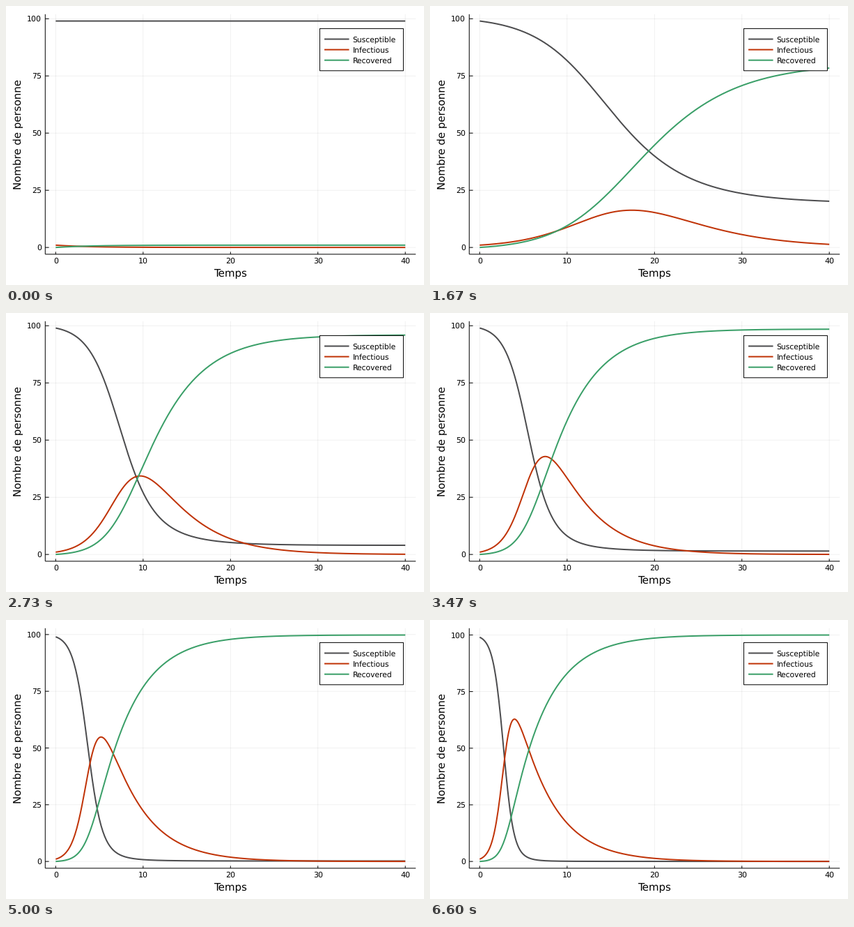
A matplotlib script that plays this animation: 600 px wide and 400 px high, repeating every 6.67 s.

```python
import numpy as np
import matplotlib.pyplot as plt
from matplotlib.animation import FuncAnimation
from matplotlib.patches import Rectangle

W, H, DPI = 600, 400, 100
LOOP, STEPS, TICKS = 6670, 100, 4   # each step lasts four timer ticks
LEFT, RIGHT, TOP, BOTTOM = 56.3, 588.2, 11.8, 355.9
T_MAX, DT = 40, 0.1
GAMMA = 0.25
BETAS = np.linspace(0, 2, STEPS)
SERIES = [("Susceptible", "#4c4c4e"), ("Infectious", "#c03307"), ("Recovered", "#3a9f68")]

plt.rcParams.update({"font.family": "DejaVu Sans", "text.hinting": "none"})


def px(n):
    return n * 72 / DPI


def sir(beta):
    """Euler steps of the SIR model, population in percent."""
    steps = int(round(T_MAX / DT))
    out = np.empty((steps + 1, 3))
    s, i, r = out[0] = 99.0, 1.0, 0.0
    for n in range(steps):
        infected = beta * s * i / 100 * DT
        healed = GAMMA * i * DT
        s, i, r = s - infected, i + infected - healed, r + healed
        out[n + 1] = s, i, r
    return out


def to_x(t):
    pad = 0.03 * T_MAX
    return LEFT + (t + pad) / (T_MAX + 2 * pad) * (RIGHT - LEFT)


def to_y(v, top):
    return BOTTOM - (v / top + 0.03) / 1.06 * (BOTTOM - TOP)


fig = plt.figure(figsize=(W / DPI, H / DPI), dpi=DPI, facecolor="white")
ax = fig.add_axes([0, 0, 1, 1])
ax.set(xlim=(0, W), ylim=(H, 0))
ax.axis("off")


def line(xs, ys, color="black", width=1.0, **kw):
    return ax.plot(xs, ys, color=color, lw=px(width), solid_capstyle="butt",
                   solid_joinstyle="round", snap=False, **kw)[0]


def label(x, y, text, size=11, **kw):
    return ax.text(x, y, text, fontsize=px(size), va="baseline", **kw)


def grid_line(xs, ys):
    return line(xs, ys, width=0.8, alpha=0.07, zorder=1)


# Axes
line([LEFT, LEFT], [TOP, BOTTOM], zorder=2)
line([LEFT, RIGHT], [BOTTOM, BOTTOM], zorder=2)
x_tick = 0.01 * (BOTTOM - TOP)
y_tick = 0.01 * (RIGHT - LEFT)

for t in range(0, T_MAX + 1, 10):
    x = to_x(t)
    grid_line([x, x], [TOP, BOTTOM])
    line([x, x], [BOTTOM, BOTTOM - x_tick], zorder=2)
    label(x, 369.2, str(t), ha="center")

y_marks = []
for v in range(0, 101, 25):
    y_marks.append((v, grid_line([LEFT, RIGHT], [0, 0]),
                    line([LEFT, LEFT + y_tick], [0, 0], zorder=2),
                    label(51, 0, str(v), ha="right")))

label((LEFT + RIGHT) / 2, 388.9, "Temps", 15, ha="center")
label(21.8, 184.3, "Nombre de personne", 15, ha="center",
      rotation=90, rotation_mode="anchor")

# Curves and legend
times = to_x(np.linspace(0, T_MAX, int(round(T_MAX / DT)) + 1))
curves = [line(times, times, color, 2, zorder=3) for _, color in SERIES]

ROW = 15.1
ax.add_patch(Rectangle((450.4, 32.4), 120, 4 * ROW, fc="white", ec="black",
                       lw=px(1), snap=False, zorder=4))
for n, (name, color) in enumerate(SERIES):
    y = 32.4 + ROW * (n + 1)
    line([457, 492.5], [y, y], color, 2, zorder=5)
    label(497.5, y + 4.4, name, 10.8, zorder=5)

runs = [sir(beta) for beta in BETAS]


def update(tick):
    # Switch one tick ahead so that rounding never delays a step.
    data = runs[min((tick + 1) // TICKS, STEPS - 1)]
    top = data.max()
    for curve, values in zip(curves, data.T):
        curve.set_ydata(to_y(values, top))
    for v, grid, mark, text in y_marks:
        y = to_y(v, top)
        grid.set_ydata([y, y])
        mark.set_ydata([y, y])
        text.set_y(y + 4)
    return curves


anim = FuncAnimation(fig, update, frames=STEPS * TICKS, interval=LOOP / (STEPS * TICKS),
                     repeat=True, repeat_delay=0, blit=False)
plt.show()
```
